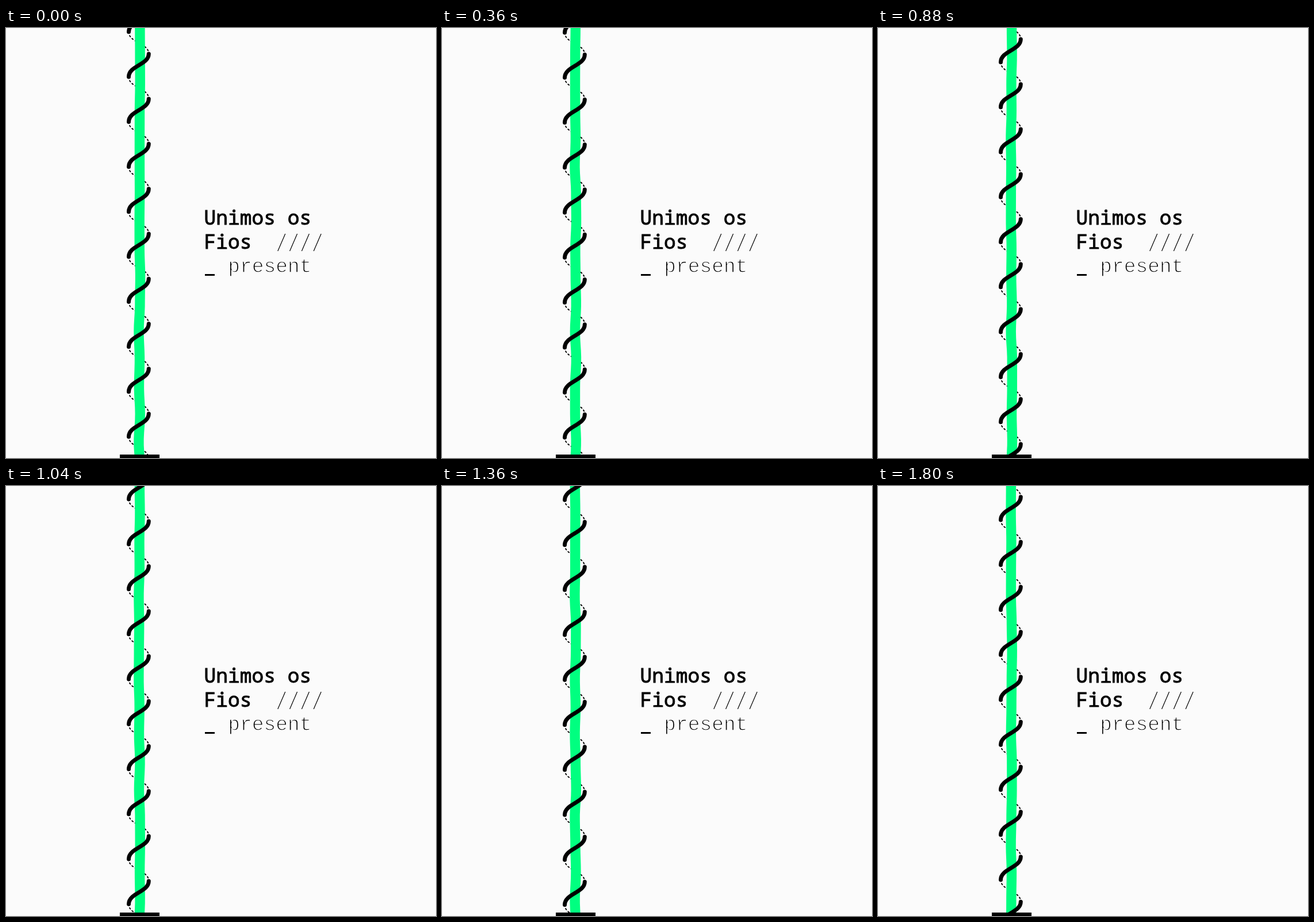
An HTML page with a canvas for the animation above (1840 ms loop, 748 by 748 pixels).

```html
<!DOCTYPE html>
<html lang="pt">
<head>
<meta charset="utf-8">
<title>Fios</title>
<style>
  html, body { margin: 0; width: 100%; height: 100%; overflow: hidden; background: #fbfbfb; }
  canvas, svg { position: absolute; left: 0; top: 0; width: 748px; height: 748px; }
  text { font-size: 34.6px; white-space: pre; }
  .bold { font-family: "Noto Sans Mono", "DejaVu Sans Mono", monospace; stroke: #000; stroke-width: 0.9px; }
  /* background-coloured outline slims the letters */
  .thin { font-family: "Liberation Mono", monospace; stroke: #fbfbfb; stroke-width: 1.4px; }
</style>
</head>
<body>
<canvas id="stage" width="748" height="748"></canvas>
<svg viewBox="0 0 748 748">
  <text class="bold" x="344.5" y="342">Unimos os</text>
  <text class="bold" x="344.5" y="383.5">Fios</text>
  <text class="thin" x="386.3" y="425">present</text>
</svg>
<script>
const ctx = document.getElementById('stage').getContext('2d');
const SIZE = 748, LOOP = 1840, STEP = 40;
const PITCH = 78.25, TICK = 4.185;   // coil spacing, drop per tick
const LEFT = 213.5, RIGHT = 248.3;
const MID = 232.1, HALF = 8.7, SWAY = 1.5;
const KNOT = 48, HOLD = 8;           // wobble size in pixels and in steps

const mix = (a, b, k) => a + (b - a) * k;
const ease = k => (1 - Math.cos(Math.PI * k)) / 2;

// seeded value in -1..1
function rand(i, j) {
  const s = Math.sin(i * 127.1 + j * 311.7 + 7) * 43758.5453;
  return (s - Math.floor(s)) * 2 - 1;
}

function noise(u, v) {
  const i = Math.floor(u), j = Math.floor(v), k = ease(u - i);
  const row = n => mix(rand(i, n), rand(i + 1, n), k);
  return mix(row(j), row(j + 1), ease(v - j));
}

function drawBand(step) {
  const centre = y => MID + SWAY * noise(y / KNOT, step / HOLD);
  ctx.fillStyle = '#00ff80';
  ctx.beginPath();
  for (let y = 0; y <= SIZE; y += 11) ctx.lineTo(centre(y) - HALF, y);
  for (let y = SIZE; y >= 0; y -= 11) ctx.lineTo(centre(y) + HALF, y);
  ctx.fill();
}

function drawCoils(first, front) {
  ctx.strokeStyle = '#000';
  ctx.lineCap = 'round';
  ctx.lineWidth = front ? 7 : 1.9;
  ctx.setLineDash(front ? [] : [2.4, 4.2]);
  for (let y = first; y < SIZE + PITCH; y += PITCH) {
    ctx.beginPath();
    if (front) {
      ctx.moveTo(RIGHT, y);
      ctx.bezierCurveTo(RIGHT, y + 19, LEFT, y + 20.5, LEFT, y + 40);
    } else {
      ctx.moveTo(LEFT, y + 40);
      ctx.bezierCurveTo(LEFT, y + 59, RIGHT, y + 59, RIGHT, y + PITCH);
    }
    ctx.stroke();
  }
  ctx.setLineDash([]);
}

function drawMarks() {
  ctx.fillStyle = '#000';
  ctx.fillRect(198, 742, 69, 6);
  ctx.fillRect(346, 428, 17, 3);
  ctx.lineWidth = 1.2;
  ctx.lineCap = 'butt';
  for (let i = 0; i < 4; i++) {
    const x = 472.8 + i * 20.8;
    ctx.beginPath();
    ctx.moveTo(x, 388);
    ctx.lineTo(x + 13, 358);
    ctx.stroke();
  }
}

function draw(now) {
  const step = Math.floor((now % LOOP) / STEP);
  // the coils start a little late, then fall 2.4 whole ticks per step
  const ticks = Math.max(step, Math.floor(2.4 * step - 2 + 1e-6));
  const first = (45 + ticks * TICK) % PITCH - PITCH;
  ctx.fillStyle = '#fbfbfb';
  ctx.fillRect(0, 0, SIZE, SIZE);
  drawCoils(first, false);
  drawBand(step);
  drawCoils(first, true);
  drawMarks();
}

const start = performance.now();
function loop() {
  draw(performance.now() - start);
  requestAnimationFrame(loop);
}
loop();
</script>
</body>
</html>
```
